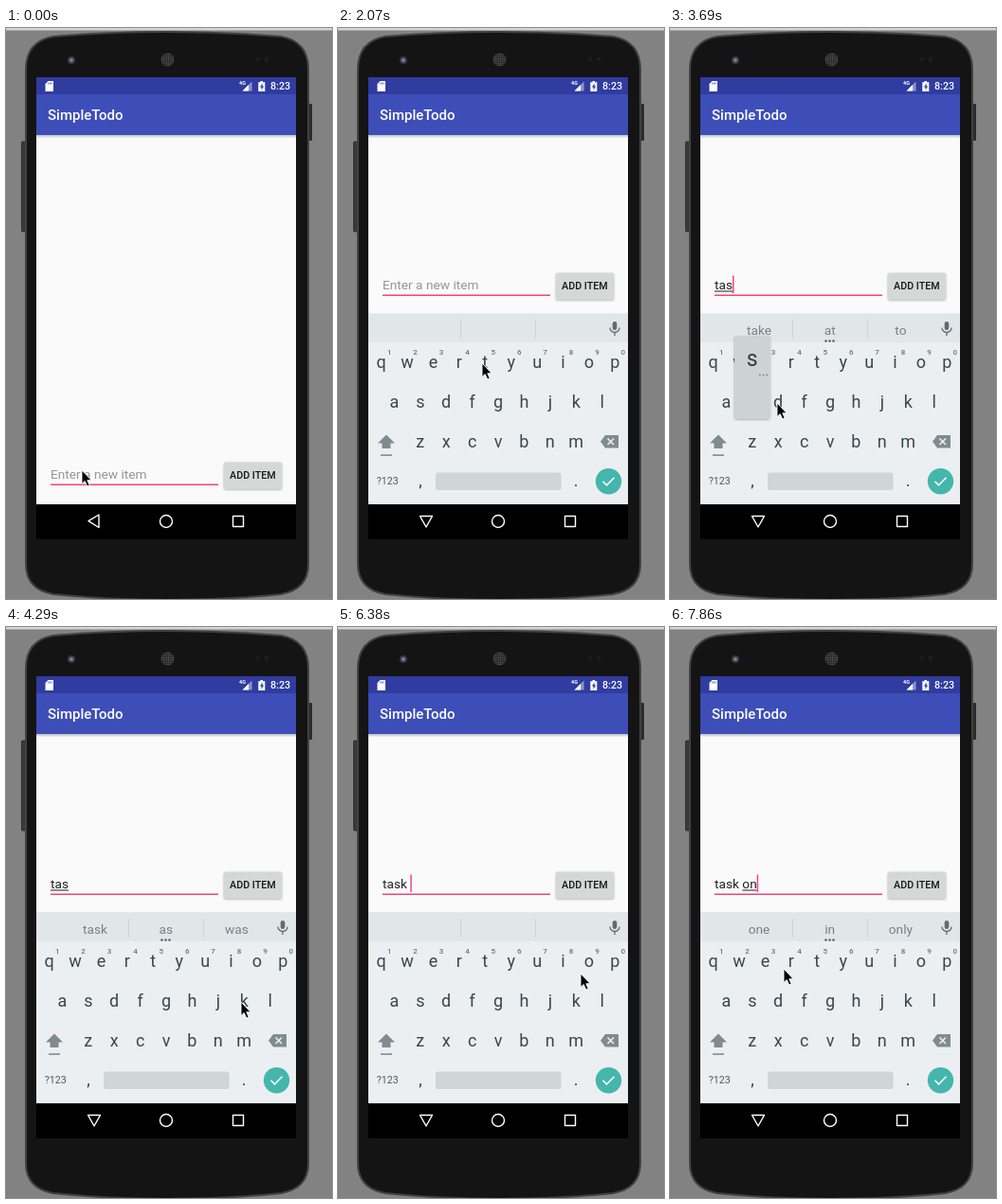
Write an HTML page that moves like this. It is 344 px wide and 603 px high and loops after 8000 ms.

```html
<!DOCTYPE html>
<html lang="en">
<head>
<meta charset="utf-8">
<title>Todo typing</title>
<style>
html, body { margin: 0; width: 100%; height: 100%; overflow: hidden; background: #828282; }
svg { display: block; width: 100vw; height: 100vh; font-family: Roboto, sans-serif; }
text { white-space: pre; }
.mid { text-anchor: middle; }
</style>
</head>
<body>
<svg viewBox="0 0 344 603">
  <defs>
    <clipPath id="content"><rect x="32" y="113" width="274" height="390"/></clipPath>
    <linearGradient id="drop" x2="0" y2="1">
      <stop offset="0" stop-opacity=".24"/><stop offset="1" stop-opacity="0"/>
    </linearGradient>
    <pattern id="mesh" width="2.4" height="2.4" patternUnits="userSpaceOnUse">
      <rect width="2.4" height="2.4" fill="#242424"/><circle cx="1.2" cy="1.2" r=".8" fill="#5c5c5c"/>
    </pattern>
    <filter id="soft" x="-20%" y="-20%" width="140%" height="150%">
      <feDropShadow dx="0" dy="1" stdDeviation=".8" flood-opacity=".35"/>
    </filter>
  </defs>

  <!-- phone -->
  <rect width="344" height="603" fill="#828282"/>
  <rect width="344" height="2.5" fill="#d3d5d3"/>
  <rect x="16.5" y="120" width="5" height="95" rx="1" fill="#3a3a3a" stroke="#222" stroke-width=".8"/>
  <rect x="318" y="80" width="5" height="39" rx="1" fill="#2c2c2c"/>
  <path d="M21 44Q21 14 50 9Q110 4 170 4T290 9Q319 14 319 44V566Q319 593 290 598Q230 604 170 604T50 598Q21 593 21 566Z" fill="#141414" stroke="#414141" stroke-width="2"/>
  <circle cx="69" cy="34" r="4" fill="#3a3a45"/><circle cx="69" cy="34" r="2" fill="#7d7d9c"/>
  <circle cx="170.5" cy="33.5" r="7" fill="url(#mesh)"/>
  <circle cx="266" cy="33" r="2.4" fill="#1f1c1c"/><circle cx="275" cy="33" r="2.4" fill="#1f1c1c"/>

  <!-- bars -->
  <rect x="32" y="52" width="274" height="488" fill="#fafafa"/>
  <rect x="32" y="52" width="274" height="18.5" fill="#303c9f"/>
  <rect x="32" y="70" width="274" height="43" fill="#3d4eb8"/>
  <rect x="32" y="113" width="274" height="3.5" fill="url(#drop)"/>
  <path d="M44.5 56H50V67H41.500V59Z" fill="#fff"/>
  <path d="M44.7 57.500v2M46.500 57.500v2M48.300 57.500v2" stroke="#303c9f" stroke-width=".8"/>
  <text x="246" y="60" font-size="5.5" font-weight="700" fill="#fff">4G</text>
  <path d="M259.500 56.500V66.500H249.500Z" fill="#8d95cb"/><path d="M256 60V66.500H249.500Z" fill="#fff"/>
  <path d="M268.500 56h2.500v1.200h2.300V67h-7V57.200h2.200Z" fill="#fff"/>
  <path d="M270.600 58.500l-2.700 4h1.600v3l2.700-4h-1.600Z" fill="#303c9f"/>
  <text x="279" y="65.300" font-size="10.700" font-weight="500" fill="#fff">8:23</text>
  <text x="44" y="97.300" font-size="15" font-weight="500" fill="#fff">SimpleTodo</text>

  <!-- input row -->
  <g id="row">
    <text id="hint" x="47" y="476" font-size="13.7" fill="#969696">Enter a new item</text>
    <text id="typed" x="47" y="476" font-size="13.7" fill="#212121"></text>
    <rect id="compose" y="477.500" height="1" fill="#212121"/>
    <rect x="47" y="481.500" width="177" height="1.500" fill="#f5407f"/>
    <rect id="caret" y="461.500" width="1.500" height="18.500" fill="#ff4081"/>
    <rect x="230" y="458.500" width="61" height="28" rx="1.500" fill="#d6d7d7" filter="url(#soft)"/>
    <text class="mid" x="260.300" y="476.300" font-size="10.700" font-weight="500" fill="#161616">ADD ITEM</text>
  </g>

  <!-- keyboard -->
  <g clip-path="url(#content)">
    <g id="board">
      <rect x="32" y="301" width="274" height="203" fill="#eceff1"/>
      <rect x="32" y="301.500" width="274" height="30.500" fill="#e1e6e9"/>
      <path d="M129.500 308v20M208.500 308v20" stroke="#cdd4d7"/>
      <g id="words" class="mid" font-size="13.7" fill="#74828a"></g>
      <g id="more" fill="#4f5d64">
        <circle cx="164.500" cy="330.500" r="1.200"/><circle cx="168.500" cy="330.500" r="1.200"/><circle cx="172.500" cy="330.500" r="1.200"/>
      </g>
      <rect x="289.700" y="310" width="4.600" height="9" rx="2.300" fill="#5e6c72"/>
      <path d="M287 316.500a5 5 0 0 0 10 0M292 321.500v3.500" fill="none" stroke="#5e6c72" stroke-width="1.300"/>
      <g id="keys" class="mid" font-size="18" fill="#37474f"></g>
      <path d="M51 429.500L60 438.500H55.500V444H46.500V438.500H42Z" fill="#7f8b90"/>
      <rect x="45" y="450.300" width="12" height="1.600" fill="#7f8b90"/>
      <path d="M282 430H296V443.500H282L277 436.700Z" fill="#7f8b90"/>
      <path d="M284.500 433.500l6.500 6.500m0-6.500l-6.500 6.500" stroke="#eceff1" stroke-width="1.600"/>
      <text class="mid" x="52.300" y="482.300" font-size="10.700" fill="#4b5a61">?123</text>
      <text class="mid" x="87" y="484" font-size="18" fill="#37474f">,</text>
      <text class="mid" x="251" y="484" font-size="18" fill="#37474f">.</text>
      <rect x="103" y="469.500" width="132.500" height="18.500" rx="2.500" fill="#cfd6d6"/>
      <circle cx="285.500" cy="478.700" r="13.700" fill="#45b6ab"/>
      <path d="M279.500 478.800l4 4 8-8" fill="none" stroke="#fff" stroke-width="1.600"/>
    </g>
  </g>

  <g id="popup">
    <rect x="-18.700" y="-70" width="37.500" height="87.500" rx="2" fill="#cdd3d5" filter="url(#soft)"/>
    <text class="mid" y="-38" font-size="23" fill="#2f3d44"></text>
    <g fill="#7d898e"><circle cx="8" cy="-28.500" r=".9"/><circle cx="11.800" cy="-28.500" r=".9"/><circle cx="15.600" cy="-28.500" r=".9"/></g>
  </g>

  <!-- navigation -->
  <rect x="32" y="503" width="274" height="37" fill="#000"/>
  <g fill="none" stroke="#fff" stroke-width="1.400" stroke-linejoin="round">
    <path id="back"/>
    <circle cx="169" cy="521" r="6.500"/><rect x="239.500" y="515.500" width="11" height="11"/>
  </g>

  <path id="mouse" d="M0 0V14.500L3.200 11.500L5.700 17L8.200 16L5.800 10.700H10.200Z" fill="#000" stroke="#fff" stroke-width=".9"/>
</svg>

<script>
const LOOP = 8000, TICK = LOOP / 54, BLINK = 500;
const $ = id => document.getElementById(id);
const put = (node, attrs) => { for (const k in attrs) node.setAttribute(k, attrs[k]); };
const show = (node, on) => put(node, { visibility: on ? 'visible' : 'hidden' });

function label(parent, x, y, text, attrs = {}) {
  const node = document.createElementNS('http://www.w3.org/2000/svg', 'text');
  put(node, { x, y, ...attrs });
  node.textContent = text;
  parent.append(node);
  return node;
}

// Key caps
const PITCH = 27.4, keyAt = {};
[['qwertyuiop', 45.7], ['asdfghjkl', 59.4], ['zxcvbnm', 86.8]].forEach(([letters, x0], row) => {
  [...letters].forEach((ch, i) => {
    const x = x0 + i * PITCH, y = 353 + row * 42;
    keyAt[ch] = [x, y];
    label($('keys'), x, y + 6, ch);
    if (!row) label($('keys'), x + 8.5, y - 8.5, (i + 1) % 10, { 'font-size': 8, 'font-weight': 500, fill: '#66747b' });
  });
});
const words = [94, 168.7, 243.4].map(x => label($('words'), x, 323.5, ''));

// Ticks: popup opens, text is committed; then the suggestions that follow
const strokes = [
  { key: 't', down: 15, at: 16, done: '', word: 't', tips: 'to the this' },
  { key: 'a', down: 20, at: 21, done: '', word: 'ta', tips: 'take at to' },
  { key: 's', down: 24, at: 25, done: '', word: 'tas', tips: 'task as was' },
  { key: 'k', down: 31, at: 31, done: '', word: 'task', tips: 'tasked tasks take' },
  { key: ' ', down: 40, at: 40, done: 'task ', word: '', tips: '' },
  { key: 'o', down: 45, at: 46, done: 'task ', word: 'o', tips: 'of on or' },
  { key: 'n', down: 49, at: 50, done: 'task ', word: 'on', tips: 'one in only' }
];

// Pointer stops: tick, x, y
const path = [
  [8, 80, 467], [14, 152, 354], [16, 152, 354], [19, 61, 395], [22, 61, 395], [24, 85, 395],
  [25, 113, 396], [29, 248, 396], [34, 248, 396], [35, 217, 430], [38, 186, 475], [40, 186, 475],
  [43, 256, 366], [44, 261, 354], [46, 261, 354], [47, 245, 378], [49, 221, 438], [51, 221, 438],
  [53, 120, 361]
];

function pointer(n) {
  const i = path.findIndex(p => p[0] >= n);
  if (i < 1) return path[i < 0 ? path.length - 1 : 0].slice(1);
  const [a, ax, ay] = path[i - 1], [b, bx, by] = path[i];
  const k = (n - a) / (b - a);
  return [ax + (bx - ax) * k, ay + (by - ay) * k];
}

const pen = document.createElement('canvas').getContext('2d');
function width(text) {
  pen.font = '13.7px Roboto, sans-serif';
  return pen.measureText(text).width;
}

function draw(ms) {
  const n = Math.floor(ms / TICK + 0.12);
  const last = strokes.filter(s => s.at <= n).pop();
  const { done, word } = last || { done: '', word: '' };

  const rise = Math.min(1, Math.max(0, (n - 3) / 4));
  put($('board'), { transform: `translate(0 ${202 * (1 - rise) ** 2})` });
  show($('board'), n > 3);
  put($('row'), { transform: `translate(0 ${n < 5 ? 0 : -200})` });
  put($('back'), { d: n < 4 ? 'M98 514V527.500L87 520.700Z' : 'M86.500 515.500H99.500L93 527Z' });

  show($('hint'), !last);
  $('typed').textContent = done + word;
  const start = 47 + width(done), end = start + width(word);
  put($('compose'), { x: start, width: end - start });
  put($('caret'), { x: last ? end : 47 });
  const age = (n - (last ? last.at : 2)) * TICK;
  show($('caret'), age >= 0 && Math.floor(age / BLINK) % 2 === 0);

  const tip = strokes.filter(s => s.key === ' ' ? s.at <= n : s.at < n).pop();
  const tips = tip && tip.tips ? tip.tips.split(' ') : ['', '', ''];
  words.forEach((node, i) => { node.textContent = tips[i]; });
  show($('more'), tips[0] !== '');

  const held = strokes.find(s => s.key !== ' ' && s.down <= n && n <= s.at);
  put($('popup'), { display: held ? 'inline' : 'none' });
  if (held) {
    const [, cap, dots] = $('popup').children;
    put($('popup'), { transform: `translate(${keyAt[held.key]})` });
    cap.textContent = held.key;
    show(dots, held.key !== 'k');
  }
  put($('mouse'), { transform: `translate(${pointer(n)})` });
}

const begin = performance.now();
function frame() {
  draw((performance.now() - begin) % LOOP);
  requestAnimationFrame(frame);
}
frame();
</script>
</body>
</html>
```
